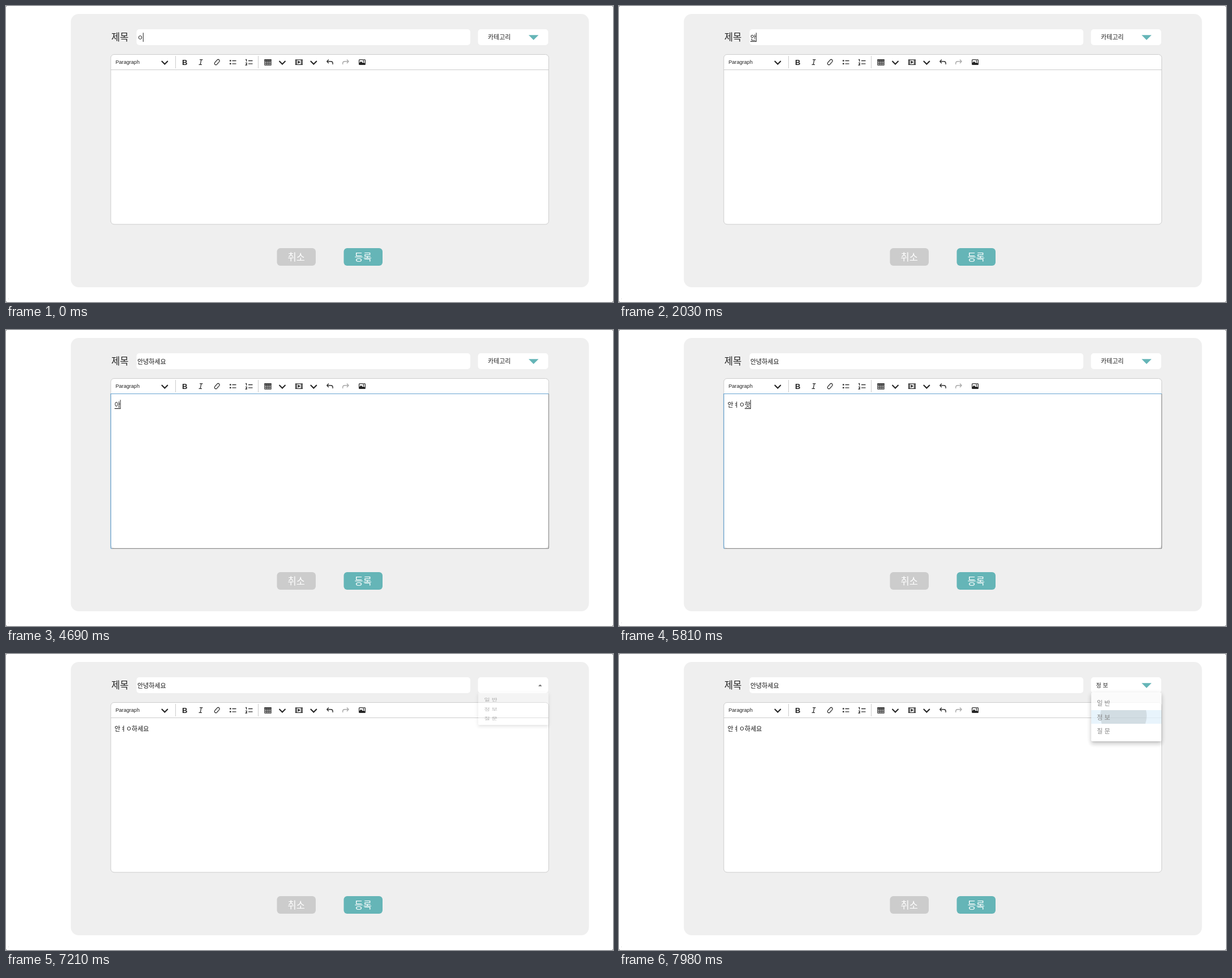
Write an HTML page that moves like this. It is 1072 px wide and 522 px high and loops after 8000 ms.

```html
<!DOCTYPE html>
<html lang="ko">
<head>
<meta charset="utf-8">
<style>
  html, body { margin: 0; width: 100%; height: 100%; overflow: hidden; background: #fff; }
  svg { position: absolute; left: 0; top: 0; }
  text, #menu { font-family: "Noto Sans CJK KR", "Noto Sans CJK", sans-serif; fill: #222; }
  .big { font-size: 16.5px; font-weight: 500; }
  .small { font-size: 11px; }
  .white { fill: #fff; }
  .latin { font-family: "Liberation Sans", sans-serif; }
  .line { fill: none; stroke: #333; stroke-width: 1.3; }
  #menu {
    position: absolute; left: 833.5px; top: 68px; width: 124px; height: 86px;
    background: #fff; border-radius: 2px; transform-origin: 50% 0; font-size: 11px; color: #222;
    box-shadow: 0 3px 3px -2px rgba(0,0,0,.2), 0 5px 7px 1px rgba(0,0,0,.14), 0 2px 10px 1px rgba(0,0,0,.12);
  }
  .item {
    position: absolute; left: 0; width: 100%; height: 24.6px; line-height: 24.6px;
    text-indent: 10.5px; overflow: hidden;
  }
  #ripple { position: absolute; border-radius: 50%; background: rgba(0,0,0,.12); }
</style>
</head>
<body>
<svg width="1072" height="522" viewBox="0 0 1072 522">
  <defs>
    <path id="chevron" d="M-5.5-2.5 0 3 5.5-2.5" fill="none" stroke="#222" stroke-width="2"/>
    <path id="undo" d="M-2-4.5-5-1.2-2 2M-5-1.2H2Q5.3-1 5.3 2V4" fill="none" stroke-width="1.4"/>
  </defs>
  <path d="M0 0h1v1h-1zM1071 0h1v1h-1zM0 521h1v1h-1zM1071 521h1v1h-1z" fill="#555"/>
  <path d="M4 516h1v1h-1z" fill="#ccc"/>
  <rect x="114.5" y="14" width="915" height="482" rx="14" fill="#efefef"/>

  <text class="big" x="186" y="60.5">제목</text>
  <rect x="230.5" y="41" width="589.5" height="28" rx="5" fill="#fff"/>
  <rect x="833.5" y="41" width="124" height="28" rx="5" fill="#fff"/>
  <text id="category" y="59"></text>
  <path id="arrow"/>

  <rect x="185" y="85.5" width="773.5" height="299.5" rx="6" fill="#fff" stroke="#ccc"/>
  <path d="M185 112.5H958.5M299.5 88V110M445.5 88V110" stroke="#ccc"/>
  <g id="focus" fill="none" stroke-width="1.2">
    <path d="M958.5 112.5V383.5Q958.5 385.5 956.5 385.5H187" stroke="#8c8c8c"/>
    <path d="M187 385.5Q185 385.5 185 383.5V112.5H958.5" stroke="#68a5d2"/>
  </g>

  <text class="latin" x="193.5" y="101.7" font-size="9.1">Paragraph</text>
  <use href="#chevron" x="280.3" y="99.5"/>
  <use href="#chevron" x="488" y="99.5"/>
  <use href="#chevron" x="543.3" y="99.5"/>
  <text class="latin" x="311" y="103.5" font-size="13" font-weight="700">B</text>
  <path class="line" d="M342 94.6H347.5M340.5 103.4H346M344.9 94.6 343.1 103.4"/>
  <g class="line" transform="translate(372.7 99) rotate(-48)" stroke-linecap="round">
    <path d="M.8 2.4H-3A2.4 2.4 0 0 1-3-2.4H-.8M-.8-2.4H3A2.4 2.4 0 0 1 3 2.4H2"/>
  </g>
  <path class="line" d="M399.5 96.5H406.5M399.5 101.8H406.5M428 96.5H435.5M428 101.8H435.5"/>
  <path d="M395 95.3h2.5v2.5h-2.5zM395 100.5h2.5v2.5h-2.5z" fill="#333"/>
  <path class="line" stroke-width="1" d="M423 94.5H424.6V98M423 100.3H425.2V102L423.4 104H426"/>
  <path class="line" d="M457 94.6H468V104H457zM457 98H468M457 101H468M460.7 95V104M464.4 95V104"/>
  <path d="M456.5 94H468.5V96.5H456.5z" fill="#333"/>
  <path class="line" d="M511.5 94.8H523.3V103.4H511.5zM513.3 95V103M521.5 95V103"/>
  <path d="M515.5 96.3 520 99 515.5 101.8z" fill="#222"/>
  <use href="#undo" x="571.8" y="99" stroke="#333"/>
  <use href="#undo" transform="translate(600 99) scale(-1 1)" stroke="#aaa"/>
  <rect class="line" x="623.6" y="94.6" width="10.8" height="8.8" rx="1"/>
  <path d="M624 103V100.5L627 97.5 630 100.5 631.5 99 634 101.5V103z" fill="#222"/>
  <circle cx="631.3" cy="97.2" r="1.1" fill="#222"/>

  <rect x="478.5" y="427" width="68.5" height="31" rx="6" fill="#ccc"/>
  <text class="big white" x="497.5" y="449.3">취소</text>
  <rect x="596.5" y="427" width="68.5" height="31" rx="6" fill="#65b5b7"/>
  <text class="big white" x="615.5" y="449.3">등록</text>

  <g id="title" transform="translate(232 59.7)"></g>
  <g id="body" transform="translate(191.7 135.7)"></g>
</svg>
<div id="menu">
  <div class="item" style="top:5.8px">일 반</div>
  <div class="item" style="top:30.6px"><i id="ripple"></i><span style="position:relative">정 보</span></div>
  <div class="item" style="top:55.2px">질 문</div>
</div>
<script>
const STEP = 70, LOOP = 8000, CHAR = 10.12;
const $ = id => document.getElementById(id);
const items = document.querySelectorAll('.item');

// "_" underlines the syllable being composed, "|" shows the caret.
const titleTyping = [
  [0, 'ㅇ|'], [70, 'ㅇ_|'], [210, '아_|'], [280, '안_|'], [490, '안ㅕ_|'], [700, '안ㅕㅇ_|'],
  [1120, '안ㅕㅇ_'], [1260, '안ㅕ|'], [1400, '안|'], [1540, '|'], [1750, 'ㅇ_|'], [1890, '아_|'],
  [2030, '안_|'], [2240, '안ㄴ_|'], [2380, '안녀_|'], [2450, '안녕_|'], [2730, '안녕ㅎ_|'],
  [2870, '안녕하_|'], [2940, '안녕핫_|'], [3080, '안녕하세_|'], [3220, '안녕하세요_|'],
  [3710, '안녕하세요_'], [4060, '안녕하세요']
];
const bodyTyping = [
  [0, ''], [4130, '|'], [4690, '아_|'], [4830, '안_|'], [5040, '안ㅕ_|'], [5180, '안ㅕㅇ_|'],
  [5530, '안ㅕㅇ하_|'], [5810, '안ㅕㅇ핫_|'], [5880, '안ㅕㅇ하세_|'], [5950, '안ㅕㅇ하셍_|'],
  [6090, '안ㅕㅇ하세요_|'], [6650, '안ㅕㅇ하세요_'], [7210, '안ㅕㅇ하세요']
];

function drawTyping(id, typing, t) {
  const state = typing.filter(([start]) => start <= t).pop()[1];
  const text = state.replace(/[_|]/g, '');
  const end = text.length * CHAR;
  let markup = `<text class="small" style="fill:#111">${text}</text>`;
  if (state.includes('_')) markup += `<path d="M${end - CHAR} 2.8H${end}" stroke="#222" stroke-width="1.2"/>`;
  if (state.includes('|')) markup += `<path d="M${end + .2}-12.5V3.5" stroke="#222"/>`;
  $(id).innerHTML = markup;
}

function drawSelect(t) {
  const open = t >= 7210 && t < 7980, chosen = t >= 7980;
  const label = $('category');
  label.textContent = chosen ? '정 보' : open ? '' : '카테고리';
  label.setAttribute('x', chosen ? 842.5 : 851);
  label.setAttribute('font-size', chosen ? 10 : 11);
  label.setAttribute('font-weight', chosen ? 400 : 500);
  $('arrow').setAttribute('d', open ? 'M940 57 943.3 53.5 946.6 57z' : 'M923 51.3H940.5L931.7 60z');
  $('arrow').setAttribute('fill', open ? '#777' : '#65b5b7');
}

function drawMenu(t) {
  const shown = Math.max(0, Math.min(1, (t - 7140) / 210));
  const closing = t >= 7980;
  const menu = $('menu');
  menu.style.visibility = t >= 7210 ? 'visible' : 'hidden';
  menu.style.opacity = closing ? .8 : shown;
  menu.style.transform = `scaleY(${.5 + shown / 2})`;
  menu.style.color = closing ? '#666' : '#222';
  items[0].style.background = t >= 7350 && t < 7560 ? '#f1f4f4' : '';
  items[1].style.background = closing ? '#e3f2fc' : t >= 7560 ? '#f1f4f4' : '';

  const radius = t < 7770 ? 0 : .5 + 40.5 * Math.sin((t - 7770) / 210 * Math.PI / 2);
  Object.assign($('ripple').style, {
    left: 57.5 - radius + 'px', top: 10 - radius + 'px',
    width: 2 * radius + 'px', height: 2 * radius + 'px'
  });
}

function draw(now) {
  const t = Math.floor(now % LOOP / STEP) * STEP;
  drawTyping('title', titleTyping, t);
  drawTyping('body', bodyTyping, t);
  $('focus').style.display = t >= 4130 && t < 7210 ? '' : 'none';
  drawSelect(t);
  drawMenu(t);
}

const begin = performance.now();
function tick() {
  draw(performance.now() - begin);
  requestAnimationFrame(tick);
}
tick();
</script>
</body>
</html>
```
